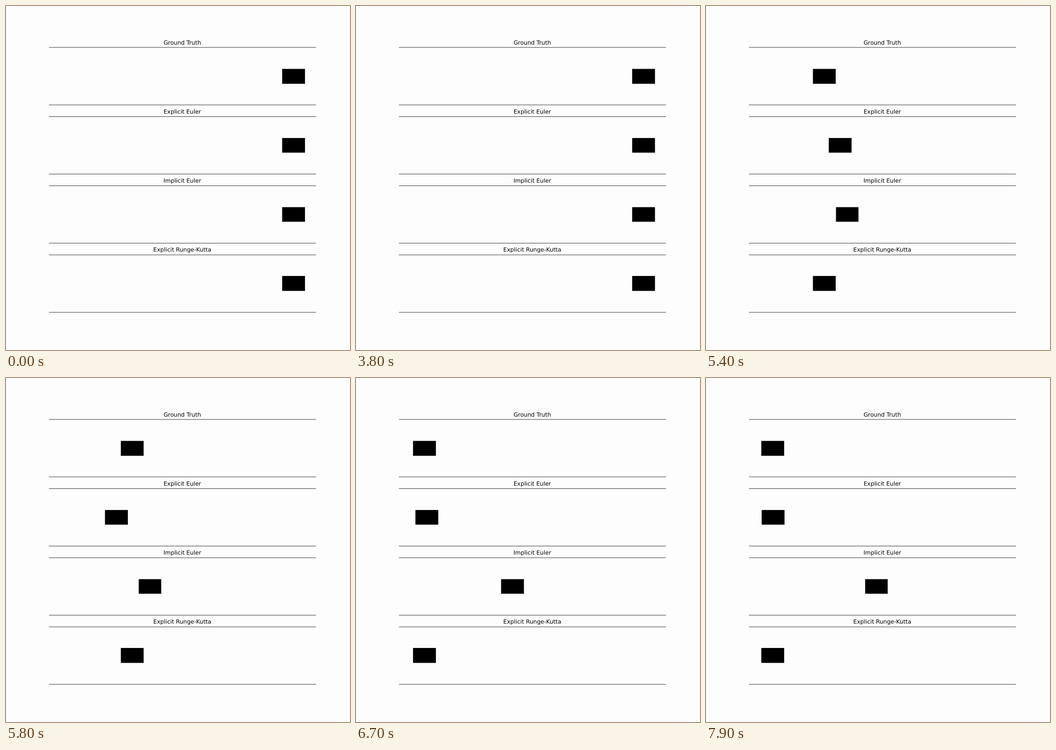
These frames come from a looping animation (748 by 748 pixels, 8000 ms). An HTML page:

```html
<!DOCTYPE html>
<html lang="en">
<head>
<meta charset="utf-8">
<title>Oscillator solvers</title>
<style>
  html, body { margin: 0; width: 100%; height: 100%; overflow: hidden; background: #fdfdfd; }
  svg { display: block; width: 748px; height: 748px; }
  text { font: 16.667px "DejaVu Sans", sans-serif; text-anchor: middle; text-rendering: geometricPrecision; }
  line { stroke: #000; stroke-width: 1.11; stroke-linecap: square; }
  rect { stroke: #000; stroke-width: 1.39; }
</style>
</head>
<body>
<svg id="stage" viewBox="0 0 1000 1000"></svg>
<script>
// Layout on a 1000-unit figure that the viewBox scales to the stage.
const LEFT = 125, RIGHT = 900, MID = (LEFT + RIGHT) / 2, UNIT = (RIGHT - LEFT) / 2.4;
const TOP = 120, HEIGHT = 770 / 4.6, PITCH = HEIGHT * 1.2, TITLE_GAP = 8.33;
const BOX_W = 0.2 * UNIT, BOX_H = HEIGHT / 4;
const LOOP = 8000, HOLD = 5000, FRAME = 100, STEPS_PER_MS = 0.015;

// Undamped spring, one solver step advances the phase by STEP.
const STEP = Math.sqrt(0.125);
const exact = n => Math.cos(n * STEP);
const eulerPhase = Math.acos(1 - STEP ** 2 / 2);
const panels = [
  ["Ground Truth", exact],
  ["Explicit Euler", n => Math.cos((n - 0.5) * eulerPhase) / Math.cos(eulerPhase / 2)],
  ["Implicit Euler", n => (1 + STEP ** 2) ** (-n / 2) * Math.cos(n * Math.atan(STEP))],
  ["Explicit Runge-Kutta", exact]
];

const stage = document.getElementById("stage");
const snap = v => Math.floor(v + 0.5) + 0.5;

function add(tag, attrs) {
  const el = document.createElementNS("http://www.w3.org/2000/svg", tag);
  for (const key in attrs) el.setAttribute(key, attrs[key]);
  return stage.appendChild(el);
}

const boxes = panels.map(([title], i) => {
  const top = TOP + i * PITCH, mid = top + HEIGHT / 2;
  for (const y of [top, top + HEIGHT])
    add("line", { x1: snap(LEFT), x2: snap(RIGHT), y1: snap(y), y2: snap(y) });
  add("text", { x: MID, y: Math.round(top - TITLE_GAP) }).textContent = title;
  const y = snap(mid - BOX_H / 2);
  return add("rect", { y, height: snap(mid + BOX_H / 2) - y });
});

function draw() {
  const t = Math.floor(performance.now() % LOOP / FRAME) * FRAME;
  const n = Math.max(0, Math.floor((t - HOLD) * STEPS_PER_MS + 0.5));
  boxes.forEach((box, i) => {
    const x = MID + UNIT * panels[i][1](n);
    const left = snap(x - BOX_W / 2);
    box.setAttribute("x", left);
    box.setAttribute("width", snap(x + BOX_W / 2) - left);
  });
  requestAnimationFrame(draw);
}
draw();
</script>
</body>
</html>
```
